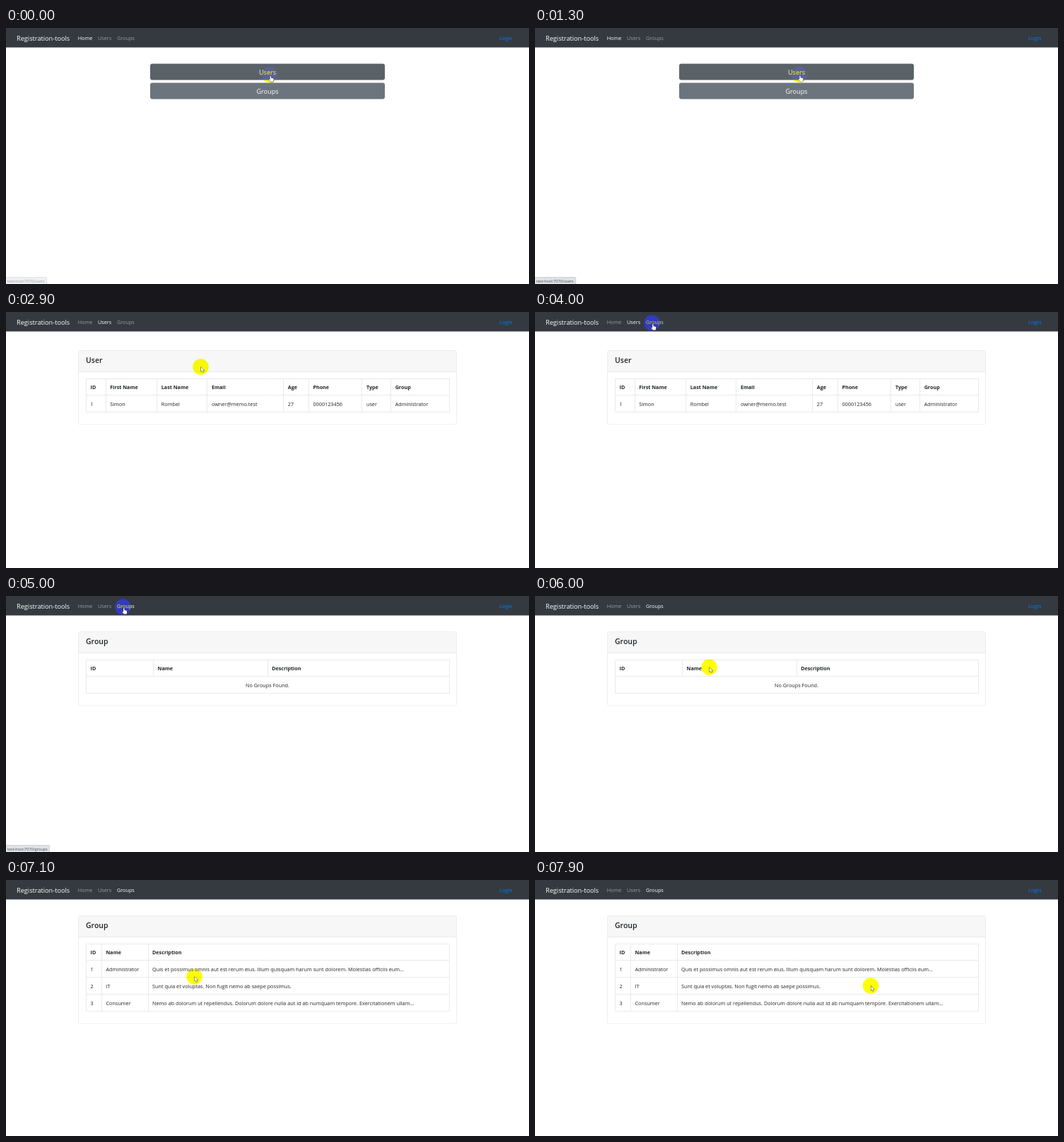
Recreate the animation shown at these times as an HTML page with a canvas. Size 740x362 px, loop 8 s.

```html
<!DOCTYPE html>
<html lang="en">
<head>
<meta charset="utf-8">
<title>Users and groups</title>
<style>
  html, body { margin: 0; width: 100%; height: 100%; overflow: hidden; background: #fff; }
  canvas { display: block; }
</style>
</head>
<body>
<canvas id="stage" width="740" height="362"></canvas>
<script>
const W = 740, H = 362, LOOP = 8000, STEP = 100;
const ctx = document.getElementById('stage').getContext('2d');
const INK = '#212529', LINE = '#e8eaed', PAD = 6, ROW = 23.7;

// When pages open, data arrives and the pointer rests on a link
const USERS_PAGE = 1800, USERS_DATA = 2300, GROUPS_PAGE = 4800, GROUPS_DATA = 6300;
const HOVER_START = 3700, HOVER_END = 5300;

const userHead = ['ID', 'First Name', 'Last Name', 'Email', 'Age', 'Phone', 'Type', 'Group'];
const userRows = [['1', 'Simon', 'Rombel', 'owner@memo.test', '27', '0000123456', 'user', 'Administrator']];
const groupHead = ['ID', 'Name', 'Description'];
const groupRows = [
  ['1', 'Administrator', 'Quis et possimus omnis aut est rerum eius. Illum quisquam harum sunt dolorem. Molestias officiis eum...'],
  ['2', 'IT', 'Sunt quia et voluptas. Non fugit nemo ab saepe possimus.'],
  ['3', 'Consumer', 'Nemo ab dolorum ut repellendus. Dolorum dolore nulla aut id ab numquam tempore. Exercitationem ullam...'],
];

// Pointer stops: time, x, y
const stops = [
  [0, 373, 66], [1900, 374, 65.5], [2600, 381, 91], [2900, 275.5, 77.5], [3500, 161, 35],
  [3800, 165.5, 15.5], [5200, 165.5, 15.5], [6000, 246.5, 100.7], [6300, 246.5, 100.7],
  [6600, 262, 79], [7100, 266.5, 136.5], [7900, 475, 149.5], [LOOP, 475, 149.5],
];

const arrow = new Path2D('M0 0V6.4L1.5 5.1L2.5 7.4L3.5 7L2.5 4.8H4.4Z');
const hand = new Path2D('M1.6 .6Q2.3 -.2 3 .6V3L6 3.7Q6.8 4 6.7 5L6.2 8.6H2.4L-.2 5.6Q0 4.5 1.6 5.4Z');

const clamp = v => Math.max(0, Math.min(1, v));
const crisp = v => Math.floor(v) + 0.5;

function setFont(size, weight = 400) {
  ctx.font = `${weight} ${size}px "Open Sans", "Noto Sans", sans-serif`;
}

function text(str, x, y, { size = 7.28, color = INK, weight = 400, align = 'left' } = {}) {
  setFont(size, weight);
  ctx.fillStyle = color;
  ctx.textAlign = align;
  ctx.fillText(str, x, y);
  return ctx.measureText(str).width;
}

function box(x, y, w, h, r, fill, stroke) {
  ctx.beginPath();
  ctx.roundRect(x, y, w, h, r);
  ctx.fillStyle = fill;
  ctx.fill();
  if (!stroke) return;
  ctx.strokeStyle = stroke;
  ctx.stroke();
}

function line(x1, y1, x2, y2) {
  ctx.strokeStyle = LINE;
  ctx.beginPath();
  ctx.moveTo(x1, y1);
  ctx.lineTo(x2, y2);
  ctx.stroke();
}

function navbar(active, hover) {
  box(0, 0, W, 27.6, 0, '#343a40');
  text('Registration-tools', 15, 17.8, { size: 9.2, color: '#fff' });
  let x = 101.7;
  for (const name of ['Home', 'Users', 'Groups']) {
    const alpha = name === active ? 1 : name === hover ? 0.75 : 0.5;
    x += text(name, x, 17.2, { color: `rgba(255,255,255,${alpha})` }) + 7.7;
  }
  text('Login', 698, 17.2, { color: '#007bff' });
}

function button(label, y, fill) {
  box(204.5, y, 331, 22, 2, fill, fill);
  text(label, W / 2, y + 14.7, { size: 9.05, color: '#fff', align: 'center' });
}

// Shares the width in proportion to each column's widest cell
function columnEdges(left, right, head, rows) {
  const widths = head.map((name, i) => {
    setFont(7.2, 700);
    const headWidth = ctx.measureText(name).width;
    setFont(7.28);
    return Math.max(headWidth, ...rows.map(row => ctx.measureText(row[i]).width)) + 2 * PAD;
  });
  const scale = (right - left) / widths.reduce((a, b) => a + b);
  const edges = [left];
  widths.forEach((w, i) => edges.push(edges[i] + w * scale));
  return edges;
}

function card(title, top, head, rows) {
  const left = 113.5, right = 627.5, count = rows.length || 1;
  const rowY = i => crisp(top + 40.2 + ROW * i);
  const bottom = rowY(count + 1);
  const baseline = i => top + 55.4 + ROW * i;

  box(102.5, top + 0.5, 535, bottom - top + 17, 2, '#fff', '#eee');
  box(103, top + 1, 534, 30, [2, 2, 0, 0], '#f7f7f7');
  line(103, top + 30.5, 637, top + 30.5);
  text(title, left - 0.5, top + 18, { size: 10.5, weight: 600 });

  for (let i = 0; i <= count + 1; i++) line(left, rowY(i), right, rowY(i));
  const edges = columnEdges(left, right, head, rows);
  edges.forEach((x, i) => {
    const outer = i % head.length === 0;
    line(crisp(x), rowY(0), crisp(x), rows.length || outer ? bottom : rowY(1));
  });
  head.forEach((name, i) => text(name, edges[i] + PAD, baseline(0), { size: 7.2, weight: 700 }));
  rows.forEach((row, r) => row.forEach((cell, i) => text(cell, edges[i] + PAD, baseline(r + 1))));
  if (!rows.length) text(`No ${title}s Found.`, W / 2, baseline(1), { align: 'center' });
}

function statusBar(page, t, from, to) {
  const url = 'test-host:7070/' + page;
  ctx.globalAlpha = clamp(Math.min(t - from, to - t) / 200);
  setFont(5.5);
  box(-1, 352.5, ctx.measureText(url).width + 6, 11, 1, '#dee1e6', '#cfd2d6');
  text(url, 2, 359.6, { size: 5.5, color: '#4a4d51' });
  ctx.globalAlpha = 1;
}

function pointerAt(t) {
  const i = stops.findIndex(stop => stop[0] > t);
  const [t1, x1, y1] = stops[i - 1], [t2, x2, y2] = stops[i];
  const k = (t - t1) / (t2 - t1);
  return [x1 + (x2 - x1) * k, y1 + (y2 - y1) * k];
}

function pointer(t, onLink) {
  const [x, y] = pointerAt(t);
  // The highlight inverts the blue channel below it
  ctx.globalCompositeOperation = 'difference';
  ctx.fillStyle = '#00f';
  ctx.beginPath();
  ctx.arc(x, y, 11.2, 0, 7);
  ctx.fill();
  ctx.globalCompositeOperation = 'source-over';

  const shape = onLink ? hand : arrow;
  ctx.save();
  ctx.translate(x + (onLink ? -1 : 0.5), y + (onLink ? 1.5 : 0.3));
  ctx.lineWidth = 0.9;
  ctx.strokeStyle = '#222';
  ctx.stroke(shape);
  ctx.fillStyle = '#fff';
  ctx.fill(shape);
  ctx.restore();
}

function draw(t) {
  const onGroups = t >= HOVER_START && t < HOVER_END;
  box(0, 0, W, H, 0, '#fff');

  if (t < USERS_PAGE) {
    navbar('Home');
    button('Users', 51, '#5a6268');
    button('Groups', 78, '#6c757d');
  } else if (t < GROUPS_PAGE) {
    navbar('Users', onGroups && 'Groups');
    card('User', 54, userHead, t < USERS_DATA ? [] : userRows);
  } else {
    navbar('Groups');
    card('Group', 50, groupHead, t < GROUPS_DATA ? [] : groupRows);
  }

  statusBar('users', t, -100, 2300);
  statusBar('groups', t, 4000, 5700);
  pointer(t, t < USERS_PAGE || onGroups);
}

const start = performance.now();
function frame() {
  const t = (performance.now() - start) % LOOP;
  draw(Math.floor(t / STEP) * STEP);
  requestAnimationFrame(frame);
}
frame();
</script>
</body>
</html>
```
